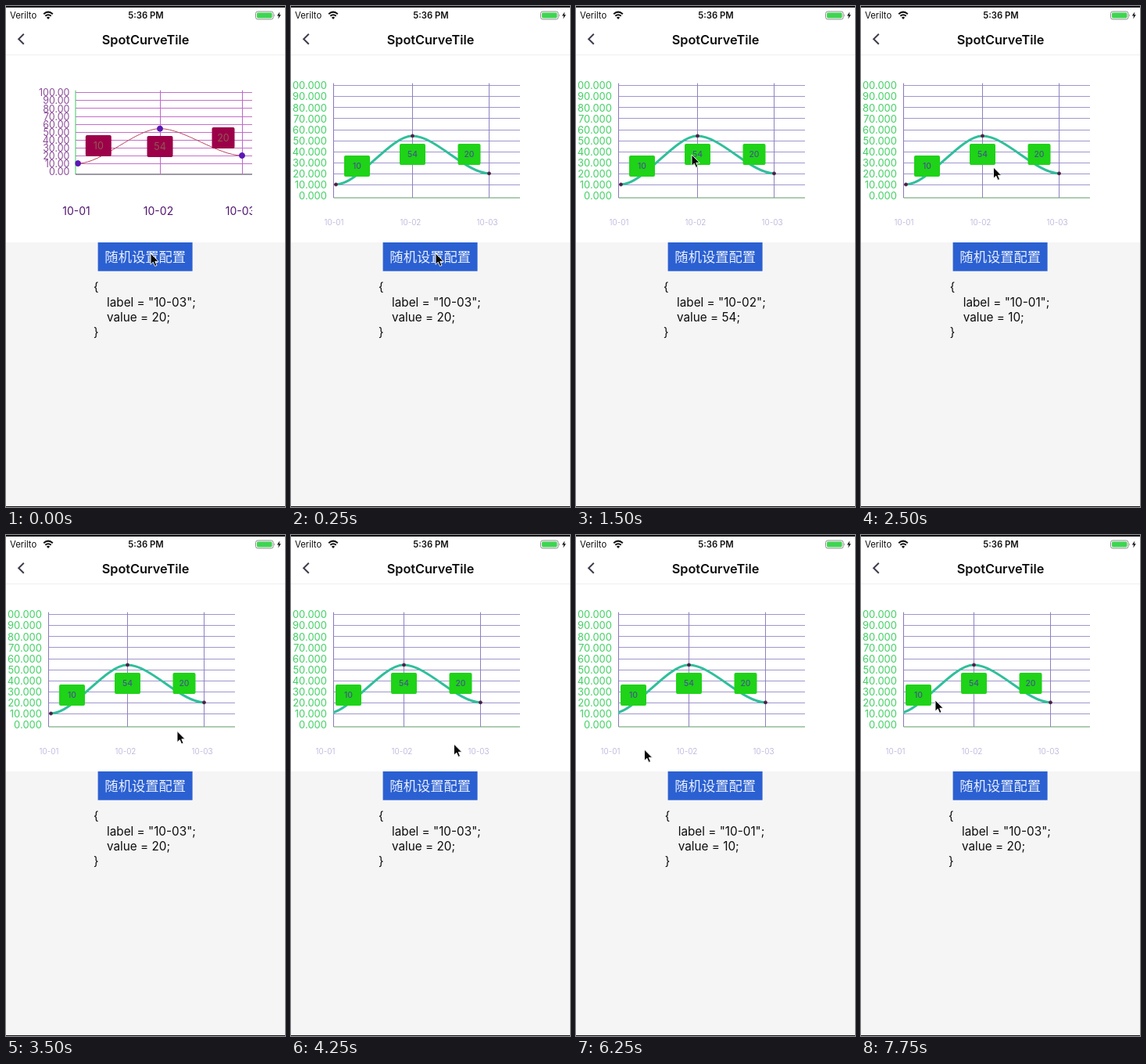
Recreate the animation shown at these times as an HTML page. Size 357 by 640 pixels, loop 8000 ms.

```html
<!DOCTYPE html>
<html lang="zh">
<head>
<meta charset="utf-8">
<title>Line chart demo</title>
<style>
html, body { margin: 0; width: 100%; height: 100%; overflow: hidden; background: #f5f5f5; }
svg { display: block; width: 100%; height: 100%; font-family: Inter, Roboto, sans-serif; }
text { white-space: pre; }
</style>
</head>
<body>
<svg viewBox="0 0 357 640">
  <rect width="357" height="640" fill="#f5f5f5"/>
  <rect width="357" height="302" fill="#fff"/>
  <path d="M0 62.5H357" stroke="#efeff1"/>
  <path d="M0 1H357" stroke="#15151a" stroke-width="2"/>
  <path d="M0 639.5H357" stroke="#15151a"/>

  <text x="5" y="16" font-size="11.3" fill="#111">Verilto</text>
  <g fill="none" stroke="#111" stroke-width="2">
    <path d="M48.2 10.2Q54 5 59.8 10.2"/>
    <path d="M50.3 12.8Q54 9.6 57.7 12.8"/>
  </g>
  <path d="M54 17L51.9 14.7Q54 13 56.1 14.7Z" fill="#111"/>
  <text x="179" y="16" font-size="11.3" font-weight="600" text-anchor="middle" fill="#111">5:36 PM</text>
  <rect x="319.5" y="7" width="22.5" height="10" rx="2.6" fill="none" stroke="#8d8d8d"/>
  <rect x="321" y="8.5" width="19.5" height="7" rx="1.4" fill="#3fd552"/>
  <path d="M343.4 10.2q1.6 1.8 0 3.6z" fill="#8d8d8d"/>
  <path d="M350.3 7.5L346.8 12.6H349L348.2 16.5L351.8 11.2H349.6Z" fill="#111"/>

  <path d="M22.8 35.8L16.2 42.3L22.8 48.8" fill="none" stroke="#3d3d4c" stroke-width="2"/>
  <text x="178.5" y="48.6" font-size="16.3" font-weight="600" text-anchor="middle" fill="#0c0c0c">SpotCurveTile</text>

  <g id="charts"></g>

  <rect x="117.6" y="302" width="121" height="36.7" fill="#2b60d2"/>
  <text x="178.2" y="327" font-size="17.3" text-anchor="middle" fill="#e9effb" font-family="'Noto Sans CJK SC', 'Noto Sans CJK', sans-serif">随机设置配置</text>

  <g id="info" font-size="15.3" fill="#0c0c0c">
    <text y="363.5">{</text>
    <text id="label" x="17" y="383.7"></text>
    <text id="value" x="17" y="403"></text>
    <text y="422">}</text>
  </g>

  <path id="cursor" d="M0 0V14.2L3.3 11.2L5.6 16.4L8 15.4L5.8 10.3H10.2Z" fill="#080808" stroke="#fff" stroke-width=".9"/>
</svg>
<script>
const DURATION = 8000, STEP = 250, TENSION = .3;
const $ = id => document.getElementById(id);
const data = [['10-01', 10], ['10-02', 54], ['10-03', 20]];

const themes = [
  {
    left: 89, right: 315, top: 110.2, unit: 1.01, base: 215, x0: 92, gap: 105,
    decimals: 2, tickX: 81.5, tickSize: 12.5, tick: '#8b4d99',
    grid: '#c56fca', vertical: '#b967c8', yAxis: '#3ccb62', xAxis: '#3c3548',
    line: '#b9475f', width: 1, dot: '#5b17b4', ring: '#5b17b4', radius: 3.5,
    box: '#9c0049', boxText: '#8a5c50', boxSize: 12.5, boxWeight: 400, boxDx: [26.3, 0, -24], boxDy: 23,
    labelDx: -2, labelY: 266.5, labelSize: 14, label: '#521470', labelWeight: 400, labelRight: 315
  },
  {
    left: 54.5, right: 293, top: 101.1, unit: 1.41, base: 245, x0: 57.5, gap: 98,
    decimals: 3, tickX: 46, tickSize: 13, tick: '#41d163',
    grid: '#a096cd', vertical: '#8f80c2', yAxis: '#8878bd', xAxis: '#5a9c62',
    line: '#2fbf9b', width: 3, dot: '#32283c', ring: '#6d2a5c', radius: 2,
    box: '#1fd318', boxText: '#45558c', boxSize: 10.3, boxWeight: 500, boxDx: [27, 0, -25.5], boxDy: 24,
    labelDx: -2.5, labelY: 280, labelSize: 10, label: '#b3a7d6', labelWeight: 300, labelRight: 357
  }
];

const line = (x1, y1, x2, y2, color) =>
  `<path d="M${x1} ${y1}L${x2} ${y2}" stroke="${color}" stroke-width="1"/>`;

const text = (x, y, str, size, fill, anchor, weight = 400) =>
  `<text x="${x}" y="${y}" font-size="${size}" fill="${fill}" text-anchor="${anchor}" font-weight="${weight}">${str}</text>`;

function chart(c, id) {
  const pts = data.map(([, v], i) => [c.x0 + i * c.gap, c.top + (100 - v) * c.unit]);
  let fixed = '', plot = '', labels = '';
  for (let v = 0; v <= 100; v += 10) {
    const y = c.top + (100 - v) * c.unit, row = Math.round(y) + .5;
    if (v) fixed += line(c.left, row, c.right, row, c.grid);
    // The clipped leading digit of the widest tick stays off the stage.
    const tick = v.toFixed(c.decimals);
    fixed += text(c.tickX, y + c.tickSize * .36 + .6, id && v === 100 ? tick.slice(1) : tick, c.tickSize, c.tick, 'end');
  }
  let d = `M${pts[0]}`;
  pts.forEach(([x, y], i) => {
    if (i) {
      const [px, py] = pts[i - 1], pull = c.gap * TENSION, col = Math.floor(x) + .5;
      d += `C${px + pull} ${py} ${x - pull} ${y} ${x} ${y}`;
      plot += line(col, c.top - 2.5, col, c.base, c.vertical);
    }
  });
  plot += `<path d="${d}" fill="none" stroke="${c.line}" stroke-width="${c.width}"/>`;
  pts.forEach(([x, y], i) => {
    plot += `<circle cx="${x}" cy="${y}" r="${c.radius}" fill="${c.dot}" stroke="${c.ring}"/>`;
    const w = i === 2 ? 29 : 33;
    const bx = x + c.boxDx[i], by = Math.floor(y + (i === 1 ? c.boxDy : -c.boxDy)) + .5;
    labels += `<rect x="${bx - w / 2}" y="${by - 13.5}" width="${w}" height="27" rx="2" fill="${c.box}"/>`;
    labels += text(bx, by + c.boxSize * .36, data[i][1], c.boxSize, c.boxText, 'middle', c.boxWeight);
    labels += text(x + c.labelDx, c.labelY, data[i][0], c.labelSize, c.label, 'middle', c.labelWeight);
  });
  const clip = (name, x, right) =>
    `<clipPath id="${name}${id}"><rect x="${x}" y="90" width="${right - x}" height="212"/></clipPath>`;
  const layer = (name, body) => `<g clip-path="url(#${name}${id})"><g class="scroll">${body}</g></g>`;
  return `<g class="chart">${clip('plot', c.left - .5, c.right)}${clip('tags', 0, c.labelRight)}${fixed}` +
    line(c.left, c.top - 2.5, c.left, c.base, c.yAxis) +
    line(c.left, c.base, c.right, c.base, c.xAxis) +
    layer('plot', plot) + layer('tags', labels) + '</g>';
}

$('charts').innerHTML = themes.map(chart).join('');
const charts = document.querySelectorAll('.chart');
const scrolls = charts[1].querySelectorAll('.scroll');

// [time, x, y]
const path = [
  [0, 185, 316], [500, 185, 316], [1250, 149, 194], [1500, 148, 190], [2000, 88, 202],
  [2500, 169.5, 206], [3250, 226, 192], [3750, 212, 309], [4250, 208.5, 267],
  [4500, 206, 270], [4750, 206, 270], [5500, 60, 256], [6250, 87.5, 274],
  [6750, 140, 232], [7250, 212, 190], [7750, 95, 211]
];
// [time, selected point]
const picks = [[0, 2], [1250, 1], [2000, 0], [3250, 2], [6250, 0], [6750, 1], [7250, 2]];
const offset = [[0, 0], [3500, 0], [4000, -11]];

function sample(keys, t) {
  const i = keys.findIndex(k => k[0] > t);
  if (i < 0) return keys[keys.length - 1].slice(1);
  const a = keys[i - 1], b = keys[i], p = (t - a[0]) / (b[0] - a[0]);
  const e = p * p * (3 - 2 * p);
  return a.slice(1).map((v, n) => v + (b[n + 1] - v) * e);
}

function render(time) {
  const t = Math.floor(time % DURATION / STEP) * STEP;
  const themed = t >= 250;
  charts[0].style.display = themed ? 'none' : '';
  charts[1].style.display = themed ? '' : 'none';
  const [dx] = sample(offset, t);
  scrolls.forEach(g => g.setAttribute('transform', `translate(${dx})`));
  const pick = picks.filter(p => p[0] <= t).pop()[1];
  const [label, value] = data[pick];
  $('label').textContent = `label = "${label}";`;
  $('value').textContent = `value = ${value};`;
  $('info').setAttribute('transform', `translate(${pick ? 112 : 113.7})`);
  $('cursor').setAttribute('transform', `translate(${sample(path, t)})`);
}

const start = performance.now();
function tick() {
  render(performance.now() - start);
  requestAnimationFrame(tick);
}
tick();
</script>
</body>
</html>
```
